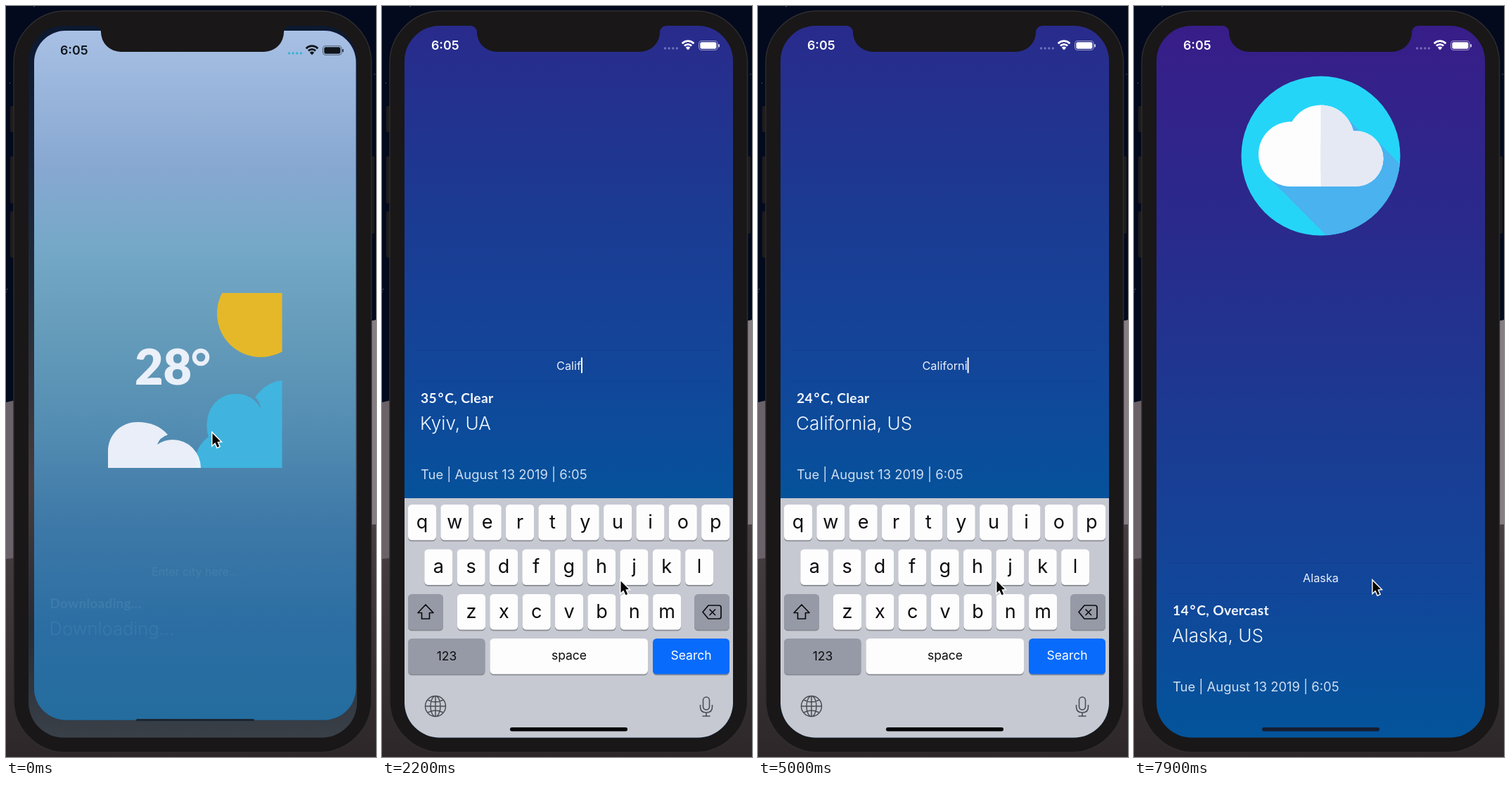
Recreate the animation shown at these times as an HTML page with a canvas. Size 526 by 1065 pixels, loop 8 s.

```html
<!DOCTYPE html>
<html lang="en">
<head>
<meta charset="utf-8">
<title>Weather app</title>
<style>
html, body { margin: 0; width: 100%; height: 100%; overflow: hidden; background: #040a1a; }
canvas { display: block; width: 526px; height: 1065px; }
</style>
</head>
<body>
<canvas id="stage" width="526" height="1065"></canvas>
<script>
const ctx = document.getElementById('stage').getContext('2d');
const LOOP = 8000, STEP = 100, TAU = Math.PI * 2;
const SANS = 'Inter, "Liberation Sans", sans-serif';
const ROUND = 'Lato, Inter, sans-serif';
const SCREEN = { x: 32, y: 28, w: 467, h: 1009.5 };
const KEYBOARD_HEIGHT = 339.5, SAFE_AREA = 38, MID = 265.5, ICON_Y = 212.5;

const clamp = v => Math.max(0, Math.min(1, v));
const ramp = (t, a, b) => clamp((t - a) / (b - a));
const spring = ms => ms <= 0 ? 0 : 1 - (1 + .0188 * ms) * Math.exp(-.0188 * ms);

// ---- drawing helpers ----
function box(x, y, w, h, r, fill) {
  ctx.beginPath();
  ctx.roundRect(x, y, w, h, r);
  if (fill) { ctx.fillStyle = fill; ctx.fill(); }
}
function disc(x, y, r, fill) {
  ctx.beginPath();
  ctx.arc(x, y, r, 0, TAU);
  ctx.fillStyle = fill;
  ctx.fill();
}
function polygon(points, fill) {
  ctx.beginPath();
  points.forEach(p => ctx.lineTo(...p));
  ctx.closePath();
  ctx.fillStyle = fill;
  ctx.fill();
}
function shape(d, fill) {
  ctx.fillStyle = fill;
  ctx.fill(new Path2D(d));
}
function outline(d, color, width) {
  ctx.strokeStyle = color;
  ctx.lineWidth = width;
  ctx.stroke(new Path2D(d));
}
function text(str, x, y, font, fill, align = 'left', spacing = 0) {
  ctx.font = font;
  ctx.fillStyle = fill;
  ctx.textAlign = align;
  ctx.letterSpacing = spacing + 'px';
  ctx.fillText(str, x, y);
  ctx.letterSpacing = '0px';
}
function gradient(x0, y0, x1, y1, ...stops) {
  const g = ctx.createLinearGradient(x0, y0, x1, y1);
  stops.forEach(([p, c]) => g.addColorStop(p, c));
  return g;
}
const vertical = (y0, y1, ...stops) => gradient(0, y0, 0, y1, ...stops);
function layer(draw, alpha = 1) {
  ctx.save();
  ctx.globalAlpha *= alpha;
  draw();
  ctx.restore();
}
// Paints the same drawing in two tones, split down the middle.
function halves(left, right, draw) {
  draw(left);
  layer(() => {
    ctx.beginPath();
    ctx.rect(MID, 0, MID, 1065);
    ctx.clip();
    draw(right);
  });
}

// ---- timeline ----
const searches = [
  { open: 1010, type: 1600, gap: 130, close: 3167, loaded: 3500, name: 'California', temp: '24\u200a°\u200aC, Clear', city: 'California, US', icon: sunIcon },
  { open: 4154, type: 6600, gap: 110, close: 7270, loaded: 7600, name: 'Alaska', temp: '14\u200a°\u200aC, Overcast', city: 'Alaska, US', icon: cloudIcon }
];
const ERASE_AT = 4900, ERASE_GAP = 110;

function stateAt(t) {
  const s = { shown: 0, shift: 0, field: '', caret: false, spinning: t >= 100 && t < 400,
    temp: 'Downloading...', city: 'Downloading...', icon: null, iconAlpha: 0 };
  if (t >= 300) Object.assign(s, { temp: '35\u200a°\u200aC, Clear', city: 'Kyiv, UA', icon: sunIcon, iconAlpha: ramp(t, 200, 500) });
  for (const q of searches) {
    if (t < q.open) break;
    if (t < q.close) {
      s.shown = KEYBOARD_HEIGHT * spring(t - q.open);
      s.shift = Math.max(0, s.shown - SAFE_AREA);
      const typing = t >= q.type && t < q.type + q.gap * q.name.length;
      s.caret = typing || (t - q.open) % 1000 < 620;
    } else {
      s.shown = KEYBOARD_HEIGHT * (1 - spring(t - q.close));
      s.shift = (KEYBOARD_HEIGHT - SAFE_AREA) * (1 - spring(t - q.close - 22));
      if (s.shown < 1) s.shown = s.shift = 0;
      s.caret = false;
    }
    if (t >= q.type) s.field = q.name.slice(0, Math.floor((t - q.type) / q.gap) + 1);
    s.spinning = t >= q.close - 70 && t < q.loaded;
    if (t >= q.close - 70) s.iconAlpha = ramp(t, q.loaded - 100, q.loaded + 200);
    if (t >= q.loaded) Object.assign(s, { temp: q.temp, city: q.city, icon: q.icon });
    else if (t >= q.close - 70) s.icon = null;
  }
  if (t >= ERASE_AT && t < searches[1].type) {
    s.field = s.field.slice(0, Math.max(0, 9 - Math.floor((t - ERASE_AT) / ERASE_GAP)));
    if (s.field) s.caret = true;
  }
  return s;
}

// ---- weather icons ----
function badge(color, draw) {
  disc(MID, ICON_Y, 113, color);
  layer(() => {
    ctx.beginPath();
    ctx.arc(MID, ICON_Y, 113, 0, TAU);
    ctx.clip();
    draw();
  });
}
function sunIcon() {
  badge('#496bfb', () => polygon([[272, 127], [309, 164], [322, 148], [400, 226], [400, 400], [331, 400],
    [209, 278], [200, 268], [213, 253], [179, 219], [204, 212], [225, 230], [265, 160]], '#2853e6'));
  halves('#fab41a', '#fb9b0a', color => {
    for (let i = 0; i < 8; i++) layer(() => {
      ctx.translate(MID, ICON_Y);
      ctx.rotate(i * TAU / 8);
      ctx.fillStyle = color;
      ctx.fillRect(-6.5, -86.5, 13, 26);
    });
    disc(MID, ICON_Y, 53.5, color);
  });
  halves('#f6d41c', '#e9c327', color => disc(MID, ICON_Y, 36, color));
}
function cloudIcon() {
  badge('#25d5f8', () => polygon([[298.7, 154.8], [328, 184], [342.6, 188.4], [400, 246], [400, 400],
    [348, 400], [190.5, 242.5], [265, 190]], '#49b2ef'));
  halves('#fdfdfe', '#e5e9f4', color => {
    disc(223, 210, 46, color);
    disc(MID, 188, 47.5, color);
    disc(315, 216.5, 39.5, color);
    ctx.fillStyle = color;
    ctx.fillRect(222, 195, 94, 61);
  });
}

// ---- app ----
function spinner(t) {
  ctx.lineCap = 'round';
  ctx.lineWidth = 2.2;
  const head = Math.floor(t / 83) + 1;
  for (let i = 0; i < 12; i++) {
    const a = (head - i) * TAU / 12 - TAU / 4 - 1.4;
    ctx.strokeStyle = `rgba(16,20,58,${.85 - i * .06})`;
    ctx.beginPath();
    ctx.moveTo(MID + 6 * Math.cos(a), 537 + 6 * Math.sin(a));
    ctx.lineTo(MID + 10.5 * Math.cos(a), 537 + 10.5 * Math.sin(a));
    ctx.stroke();
  }
  ctx.lineCap = 'butt';
}
function fieldText(s) {
  const label = s.field || 'Enter city here...';
  text(label, MID, 817, '400 16.3px ' + SANS, '#e9f0fa', 'center');
  if (!s.caret) return;
  const half = ctx.measureText(label).width / 2;
  ctx.fillStyle = '#fff';
  ctx.fillRect(s.field ? MID + half : MID - half - 2, 800, 2, 22);
}
function weather(s, t) {
  layer(() => {
    ctx.translate(0, -s.shift);
    ctx.fillStyle = vertical(28, 1037, [0, '#381d88'], [.3, '#292b8c'], [.55, '#1c3a92'], [.8, '#11479a'], [1, '#03549b']);
    ctx.fillRect(32, 28, 467, 1350);
    ctx.fillStyle = 'rgba(0,20,90,.13)';
    ctx.fillRect(50, 789, 432, 1);
    ctx.fillRect(50, 833, 432, 1);
    if (s.spinning) spinner(t);
    fieldText(s);
    text(s.temp, 55, 864, '700 19.3px ' + ROUND, '#f4f8ff', 'left', .3);
    text(s.city, 54, 902, '300 26.1px ' + SANS, '#f1f6ff');
    if (s.city[0] !== 'D') text('Tue | August 13 2019 | 6:05', 55, 972, '400 18.4px ' + SANS, '#cfdef0');
    if (s.icon) layer(() => {
      ctx.translate(0, -2.55 * s.shift);
      s.icon();
    }, s.iconAlpha * clamp(1 - s.shift / 125));
  });
}

// ---- keyboard ----
function key(x, y, w, fill) {
  box(x, y + 1.3, w, 51, 5.5, '#888b92');
  box(x, y, w, 50.5, 5.5, fill);
}
function keyboard(shown) {
  const GREY = '#959aa6', WHITE = '#fdfdfe', INK = '#0c0c0e', LINE = '#4b4e55';
  layer(() => {
    ctx.translate(0, SCREEN.y + SCREEN.h - shown);
    ctx.fillStyle = '#c6c9d1';
    ctx.fillRect(32, 0, 467, 345);
    [['qwertyuiop', 37, 9], ['asdfghjkl', 60.3, 72.5], ['zxcvbnm', 107, 136]].forEach(([row, x, y]) =>
      [...row].forEach((c, i) => {
        const kx = x + i * 46.35;
        key(kx, y, 40, WHITE);
        text(c, kx + 20, y + 33.5, '400 27px ' + SANS, INK, 'center');
      }));
    key(37, 136, 50, GREY);
    key(444, 136, 50, GREY);
    key(37, 199, 109.5, GREY);
    key(153.5, 199, 224.5, WHITE);
    key(385, 199, 109, '#086bfc');
    const small = '400 17.5px ' + SANS;
    text('123', 92, 230, small, INK, 'center');
    text('space', 266, 229, small, INK, 'center');
    text('Search', 439.5, 229, small, '#fff', 'center');

    ctx.lineJoin = 'round';
    outline('M62 151 L73 162.5 H67.5 V171 H56.5 V162.5 H51 Z', INK, 1.7);
    outline('M464 152 H479 Q482 152 482 155 V168 Q482 171 479 171 H464 L456 161.5 Z M465.5 157.5 L474 166 M474 157.5 L465.5 166', INK, 1.7);
    outline('M61.5 295 a14.5 14.5 0 1 0 29 0 a14.5 14.5 0 1 0 -29 0 M69 295 a7 14.5 0 1 0 14 0 a7 14.5 0 1 0 -14 0' +
      'M61.5 295 H90.5 M76 280.5 V309.5 M65 286 Q76 292 87 286 M65 304 Q76 298 87 304', LINE, 1.5);
    box(456.5, 282, 9, 18, 4.5);
    ctx.strokeStyle = LINE;
    ctx.lineWidth = 1.6;
    ctx.stroke();
    outline('M452.5 293 V296 Q452.5 304 461 304 Q469.5 304 469.5 296 V293 M461 304 V309 M455.5 309 H466.5', LINE, 1.6);
  });
}

// ---- launch screen ----
function splash() {
  ctx.fillStyle = vertical(28, 1037, [0, '#b0cbea'], [.2, '#8db0d6'], [.31, '#7ab0cb'], [.42, '#6ba4be'],
    [.58, '#5590b3'], [.7, '#407ca9'], [.85, '#2d70a3'], [1, '#256e9e']);
  ctx.fillRect(32, 28, 467, 1010);
  layer(() => {
    ctx.beginPath();
    ctx.rect(145, 407, 247.5, 248);
    ctx.clip();
    disc(362, 436, 62, '#edba20');
    shape('M270 655 C267 636 275 620 288 611 C279 580 296 550 327 550 C342 550 355 557 362 571 Q361 560 354 555 C364 541 377 532 393 531 V655 Z', '#3fb7e2');
    shape('M145 655 V632 C145 608 163 590 187 590 C205 590 220 596 230 608 Q218 612 215 622 Q225 615 237 615 A40 40 0 0 1 277 655 Z', '#f3f5fd');
  });
  text('28', 183, 537, '900 70px ' + ROUND, '#f3f5fd');
  ctx.beginPath();
  ctx.arc(277, 498, 9.3, 0, TAU);
  ctx.strokeStyle = '#f3f5fd';
  ctx.lineWidth = 6;
  ctx.stroke();
}

// ---- device ----
function statusBar(color, dots, dx, dy) {
  layer(() => {
    ctx.translate(0, dy);
    text('6:05', 70 + dx, 62.3, '600 17.8px ' + SANS, color);
    for (let i = 0; i < 4; i++) disc(402.5 + i * 5.6, 60, 1.7, dots);
    ctx.strokeStyle = color;
    ctx.lineWidth = 2.8;
    [11.8, 7.2].forEach(r => {
      ctx.beginPath();
      ctx.arc(435, 61.5, r, -TAU * .375, -TAU * .125);
      ctx.stroke();
    });
    shape('M435 62.5 L431.8 59 Q435 56.2 438.2 59 Z', color);
    box(450.5, 49.5, 26.5, 13, 4);
    ctx.globalAlpha = .5;
    ctx.lineWidth = 1.1;
    ctx.stroke();
    ctx.globalAlpha = 1;
    box(452.3, 51.2, 23, 9.6, 2.4, color);
    box(478.2, 54, 1.5, 4.5, 1, color);
  });
}
function wallpaper() {
  ctx.fillStyle = '#030a1d';
  ctx.fillRect(0, 0, 526, 1065);
  let seed = 7;
  const random = () => (seed = seed * 16807 % 2147483647) / 2147483647;
  for (let i = 0; i < 60; i++) disc(random() * 526, random() * 440, .6, '#8d93a4');
  polygon([[0, 562], [526, 445], [526, 1065], [0, 1065]], gradient(0, 0, 526, 0, [0, '#6b6168'], [1, '#877e83']));
  polygon([[0, 784], [526, 735], [526, 1065], [0, 1065]], vertical(735, 1065, [0, '#483f42'], [1, '#2d2729']));
}
function phone() {
  [[142, 37], [213, 67], [291, 66]].forEach(([y, h]) => box(6, y, 8, h, 2, '#1d1b1c'));
  box(515, 213, 9, 110, 2, '#1d1b1c');
  box(11, 7, 508.5, 1051.5, 74, '#191718');
  ctx.strokeStyle = '#302d2e';
  ctx.lineWidth = 1.4;
  ctx.stroke();
}
function notch() {
  shape('M126 27 H404 V28 A9 9 0 0 0 395 37 A28 28 0 0 1 367 65 H163 A28 28 0 0 1 135 37 A9 9 0 0 0 126 28 Z', '#191718');
}
function pointer(t) {
  const stops = [[0, 293, 604], [500, 327, 777], [900, 339, 813.5], [LOOP, 339, 813.5]];
  const i = stops.findIndex(p => p[0] > t);
  const [a, b] = [stops[i - 1], stops[i]];
  const k = ramp(t, a[0], b[0]), e = k * k * (3 - 2 * k);
  layer(() => {
    ctx.translate(a[1] + (b[1] - a[1]) * e, a[2] + (b[2] - a[2]) * e);
    ctx.lineJoin = 'miter';
    const arrow = 'M.5 2 V18.5 L4.3 15 L7.4 21.8 L10.2 20.5 L7.3 13.9 L12 13.5 Z';
    outline(arrow, '#fff', 2.8);
    shape(arrow, '#050505');
  });
}

function draw(t) {
  const s = stateAt(t), launching = t < 100;
  const splashAlpha = t < 100 ? .94 : t < 200 ? .55 : t < 300 ? .12 : 0;
  wallpaper();
  phone();
  layer(() => {
    box(SCREEN.x, SCREEN.y, SCREEN.w, SCREEN.h, 50);
    ctx.clip();
    if (launching) {
      ctx.fillStyle = vertical(28, 1037, [0, '#0c1930'], [.35, '#202a3b'], [.65, '#453b3c'], [.85, '#252a34'], [1, '#3a4048']);
      ctx.fillRect(32, 28, 467, 1010);
      box(40, 35, 457.5, 977.5, 45);
      ctx.clip();
    }
    layer(() => {
      if (launching) ctx.transform(.98, 0, 0, .98, 40 - 32 * .98, 35 - 28 * .98);
      weather(s, t);
    });
    if (splashAlpha) layer(splash, splashAlpha);
    if (s.shown) keyboard(s.shown);
  });
  notch();
  if (launching) statusBar('#10151c', '#35b4d8', 7, 7);
  else statusBar('#fff', 'rgba(190,200,245,.45)', 0, 0);
  if (launching) box(185, 1011, 168, 3, 1.5, '#1b2630');
  else box(182, 1023, 167, 5.4, 2.7, s.shown > 15 ? '#050506' : '#151d33');
  pointer(t);
}

let lastStep = -1;
function tick(now) {
  const step = Math.floor(now % LOOP / STEP);
  if (step !== lastStep) draw((lastStep = step) * STEP);
  requestAnimationFrame(tick);
}
draw(0);
requestAnimationFrame(tick);
</script>
</body>
</html>
```
